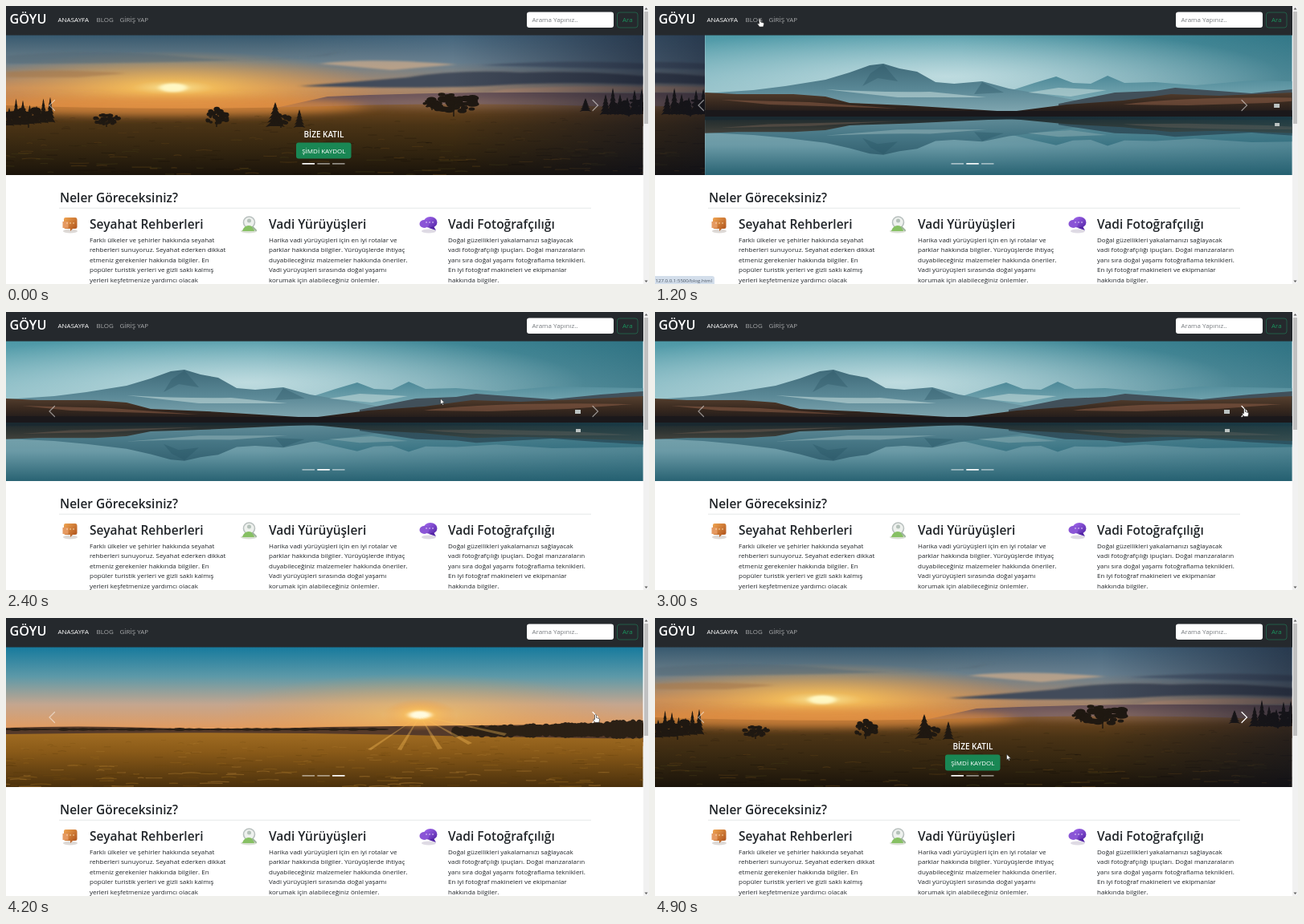
Animation of 800x347 px, one loop 5000 ms. Source, as an HTML page:

```html
<!DOCTYPE html>
<html lang="tr">
<head>
<meta charset="utf-8">
<title>Anasayfa</title>
<style>
html, body { margin: 0; width: 100%; height: 100%; overflow: hidden; background: #fff; }
svg { display: block; }
text { font: 8px "Open Sans", "Noto Sans", sans-serif; fill: #212529; }
.h { font-size: 15.5px; font-weight: 600; }
</style>
</head>
<body>
<svg width="800" height="347" viewBox="0 0 800 347">
<defs>
  <clipPath id="view"><path d="M0 36H792.500V211H0Z"/></clipPath>
  <clipPath id="pic"><path d="M0 36H793V211H0Z"/></clipPath>
  <filter id="soft" x="-20%" y="-60%" width="140%" height="220%"><feGaussianBlur stdDeviation="3 1.2"/></filter>
  <filter id="mist" x="-20%" y="-80%" width="140%" height="260%"><feGaussianBlur stdDeviation="14 5"/></filter>
  <linearGradient id="dawn" x2="0" y2="1">
    <stop stop-color="#37596f"/><stop offset=".3" stop-color="#6b7f8a"/>
    <stop offset=".58" stop-color="#c08c5f"/><stop offset="1" stop-color="#b96a30"/>
  </linearGradient>
  <linearGradient id="cool"><stop offset=".42" stop-color="#6684a0" stop-opacity="0"/><stop offset="1" stop-color="#557591" stop-opacity=".65"/></linearGradient>
  <linearGradient id="shade"><stop offset=".7" stop-color="#0b1020" stop-opacity="0"/><stop offset="1" stop-color="#0b1020" stop-opacity=".55"/></linearGradient>
  <radialGradient id="glow"><stop stop-color="#fff0a0"/><stop offset=".2" stop-color="#ffc657" stop-opacity=".85"/><stop offset="1" stop-color="#f0913a" stop-opacity="0"/></radialGradient>
  <linearGradient id="meadow" x2="0" y2="1">
    <stop stop-color="#72491f"/><stop offset=".3" stop-color="#4a3315"/><stop offset=".7" stop-color="#30230f"/><stop offset="1" stop-color="#1a130a"/>
  </linearGradient>
  <linearGradient id="teal" x2="0" y2="1"><stop stop-color="#4c98a6"/><stop offset=".5" stop-color="#7fb5bf"/><stop offset="1" stop-color="#a9cdd2"/></linearGradient>
  <linearGradient id="deep"><stop offset=".4" stop-color="#1b5a6c" stop-opacity="0"/><stop offset="1" stop-color="#1b5a6c" stop-opacity=".6"/></linearGradient>
  <radialGradient id="haze"><stop stop-color="#d3e8ea" stop-opacity=".75"/><stop offset="1" stop-color="#d3e8ea" stop-opacity="0"/></radialGradient>
  <linearGradient id="lake" x2="0" y2="1"><stop stop-color="#a9cbd1"/><stop offset=".5" stop-color="#8dbac4"/><stop offset="1" stop-color="#2f6b7b"/></linearGradient>
  <linearGradient id="peak" x2="0" y2="1"><stop stop-color="#3f6a79"/><stop offset=".5" stop-color="#5a8896"/><stop offset="1" stop-color="#86abb4"/></linearGradient>
  <linearGradient id="far" x2="0" y2="1"><stop stop-color="#4d8998"/><stop offset="1" stop-color="#98bfc6"/></linearGradient>
  <linearGradient id="shore" x2="0" y2="1"><stop stop-color="#57402f"/><stop offset=".5" stop-color="#38291f"/><stop offset="1" stop-color="#1a1719"/></linearGradient>
  <linearGradient id="dusk" x2="0" y2="1">
    <stop stop-color="#167a9d"/><stop offset=".3" stop-color="#5d99a8"/><stop offset=".58" stop-color="#c4a68f"/><stop offset=".85" stop-color="#e59a5a"/>
  </linearGradient>
  <linearGradient id="wheat" x2="0" y2="1"><stop stop-color="#a06c22"/><stop offset=".35" stop-color="#8a5a18"/><stop offset="1" stop-color="#4a300c"/></linearGradient>
  <linearGradient id="amber" x2="1" y2="1"><stop stop-color="#f0a552"/><stop offset="1" stop-color="#a94c18"/></linearGradient>
  <linearGradient id="violet" x2="1" y2="1"><stop stop-color="#a56cf0"/><stop offset="1" stop-color="#5324a6"/></linearGradient>

  <g id="one" clip-path="url(#pic)">
    <path d="M0 36H793V150H0Z" fill="url(#dawn)"/>
    <path d="M0 36H793V150H0Z" fill="url(#cool)"/>
    <ellipse cx="208" cy="102" rx="260" ry="46" fill="url(#glow)" opacity=".9"/>
    <g filter="url(#soft)">
      <path d="M0 62Q110 52 220 63T420 56L400 62Q240 72 0 72Z" fill="#566a77" opacity=".6"/>
      <path d="M390 72Q450 64 560 73L480 80Z" fill="#e2b58a" opacity=".6"/>
      <path d="M365 100Q440 94 500 89Q560 79 640 83Q720 80 800 88V98Q690 94 610 99T365 100Z" fill="#434c5a"/>
      <path d="M590 74Q690 66 800 72V79Q700 77 590 74Z" fill="#4f6074"/>
      <path d="M620 104Q710 98 800 101V108H600Z" fill="#c4967a" opacity=".7"/>
      <path d="M0 82Q70 78 150 84L90 89H0Z" fill="#a5784c" opacity=".6"/>
      <ellipse cx="208" cy="102" rx="17" ry="5.500" fill="#fff8c4"/>
    </g>
    <path d="M400 113Q560 106 793 109V135H300Z" fill="#6d565b"/>
    <path d="M0 124Q200 131 400 125T793 127V211H0Z" fill="url(#meadow)"/>
    <ellipse cx="200" cy="125" rx="250" ry="12" fill="#e08d40" opacity=".75" filter="url(#mist)"/>
    <ellipse cx="620" cy="122" rx="190" ry="6" fill="#a58270" opacity=".5" filter="url(#mist)"/>
    <g id="grass"></g><g id="trees" fill="#1f1811" stroke="#1f1811"></g>
    <path d="M0 36H793V211H0Z" fill="url(#shade)"/>
    <text x="395.500" y="164" text-anchor="middle" style="font-size:10px;font-weight:600;fill:#fff">BİZE KATIL</text>
    <rect x="361" y="170.500" width="68.500" height="20" rx="3" fill="#198754"/>
    <text x="395.300" y="183.500" text-anchor="middle" style="fill:#fff">ŞİMDİ KAYDOL</text>
  </g>

  <g id="hills">
    <path d="M370 109L410 96L437 88L458 96L480 97L501 87L522 96L560 95L610 99L680 93L793 95V137H370Z" fill="url(#far)"/>
    <path d="M0 109L60 105L100 100L150 92L180 83L205 74L222 72L242 78L264 82L287 95L310 97L345 94L378 103L420 110L470 119V137H0Z" fill="url(#peak)"/>
    <path d="M222 73L240 94L215 90L196 100L206 84ZM345 95L372 108L335 110Z" fill="#2f5866" opacity=".4"/>
    <path d="M150 104Q220 108 280 107L350 114L240 114ZM402 108L440 102L500 105L455 113Z" fill="#bfd7d8" opacity=".6"/>
    <path d="M440 122L510 108L560 106L585 102L625 105L680 109L740 103L793 99V137H440Z" fill="#41505a"/>
    <path d="M0 108L40 110L110 110L150 113L180 121L250 124L380 132L450 123L520 118L580 110L640 112L710 109L793 105V137H0Z" fill="url(#shore)"/>
    <path d="M520 123Q600 112 780 115L700 121L600 124ZM20 117L130 120L240 128L80 123Z" fill="#94624a" opacity=".5"/>
    <path d="M0 130Q390 132 793 130V138H0Z" fill="#1a181b"/>
  </g>
  <g id="two" clip-path="url(#pic)">
    <path d="M0 36H793V140H0Z" fill="url(#teal)"/>
    <path d="M0 36H793V140H0Z" fill="url(#deep)"/>
    <ellipse cx="300" cy="88" rx="420" ry="62" fill="url(#haze)"/>
    <path d="M0 137H793V211H0Z" fill="url(#lake)"/>
    <use href="#hills" transform="matrix(1 0 0 -.75 0 239.750)"/>
    <path d="M0 137H793V211H0Z" fill="#1b4f61" opacity=".3"/>
    <path d="M0 137H793V211H0Z" fill="url(#deep)" opacity=".6"/>
    <use href="#hills"/>
    <path d="M708 122h7v5h-7ZM709 146h6v4h-6Z" fill="#bcc3c2"/>
  </g>

  <g id="three" clip-path="url(#pic)">
    <path d="M0 36H793V160H0Z" fill="url(#dusk)"/>
    <ellipse cx="515" cy="121" rx="250" ry="52" fill="url(#glow)" opacity=".55"/>
    <path d="M0 137Q90 134 180 137T400 136L590 134L793 132V155H0Z" fill="#553a2a"/>
    <path d="M0 145Q250 141 500 146T793 150V211H0Z" fill="url(#wheat)"/>
    <g id="stalks"></g><g id="hedge" fill="#2b2015"></g>
    <ellipse cx="515" cy="121" rx="46" ry="20" fill="url(#glow)"/>
    <ellipse cx="515" cy="121" rx="14" ry="5" fill="#fffbe0" filter="url(#soft)"/>
    <path d="M515 122L450 164L454 165ZM515 122L487 164L492 165ZM515 122L537 164L543 163ZM515 122L575 158L580 156ZM515 122L620 147L623 144Z" fill="#ffc45d" opacity=".35"/>
  </g>
  <path id="chevron" d="M3 -6.500L-3.500 0L3 6.500" fill="none" stroke="#fff" stroke-width="1.200" stroke-linecap="round"/>
</defs>

<rect width="800" height="347" fill="#fff"/>
<g clip-path="url(#view)"><g id="track">
  <use href="#one"/><use href="#two" x="793"/><use href="#three" x="1586"/><use href="#one" x="2379"/>
</g></g>
<g id="dots" fill="#fff">
  <rect x="368.500" y="196" width="15.500" height="1.700"/><rect x="387.300" y="196" width="15.500" height="1.700"/><rect x="406" y="196" width="15.500" height="1.700"/>
</g>
<use href="#chevron" x="57.500" y="124" opacity=".5"/>
<use href="#chevron" id="next" transform="translate(733 124) scale(-1 1)"/>

<rect width="793" height="36.500" fill="#25292d"/>
<text x="4.500" y="22" style="font-size:16.2px;font-weight:600;fill:#fff">GÖYU</text>
<text x="64.500" y="20" style="fill:#fff">ANASAYFA</text>
<g opacity=".6"><text x="112.500" y="20" style="fill:#fff">BLOG</text><text x="141.500" y="20" style="fill:#fff">GİRİŞ YAP</text></g>
<rect x="648" y="7.500" width="108" height="19.500" rx="3" fill="#fff"/>
<text x="654.500" y="20" style="fill:#777b7f">Arama Yapınız..</text>
<rect x="760.500" y="8" width="25.500" height="19" rx="3" fill="none" stroke="#226b50" stroke-width=".8"/>
<text x="773.300" y="20" text-anchor="middle" style="fill:#1b935d">Ara</text>

<rect x="793" width="7" height="347" fill="#f1f1f1"/>
<rect x="794" y="7" width="5" height="140" fill="#c1c1c1"/>
<path d="M794.500 4.500L796.500 2L798.500 4.500ZM794.500 342.500L796.500 345L798.500 342.500Z" fill="#606060"/>

<text class="h" x="67" y="245">Neler Göreceksiniz?</text>
<path d="M66 252.300H728" stroke="#dcdee0" stroke-width=".7"/>
<g>
  <ellipse cx="80" cy="281" rx="9" ry="2.500" fill="#ddd9d6"/>
  <path d="M74 264H86Q88.500 264 88.500 267V276Q88.500 278 86 278H83L80 281V278H74Q72 278 72 276V266Q72 264 74 264Z" fill="url(#amber)"/>
  <path d="M70.500 269h7v8h-7Z" fill="#e59a62"/>
  <path d="M76 271h.1M80 271h.1M84 271h.1" stroke="#ffe2b5" stroke-width="1.500" stroke-linecap="round"/>
</g>
<g>
  <ellipse cx="302" cy="281" rx="10" ry="2.500" fill="#d9dfd3"/>
  <circle cx="302.500" cy="270" r="7" fill="#eef1ee" stroke="#b9c1bf" stroke-width="1.600"/>
  <circle cx="302.500" cy="268" r="2.500" fill="#b5c2ba"/>
  <path d="M294 281Q296 274 302 274T309 281Z" fill="#86c063"/>
  <path d="M307 276L311 280" stroke="#9db39b" stroke-width="2" stroke-linecap="round"/>
</g>
<g>
  <ellipse cx="526" cy="281" rx="9" ry="2.500" fill="#dedae4"/>
  <ellipse cx="528" cy="270" rx="8.500" ry="7" fill="url(#violet)"/>
  <path d="M532 275L535 280L526 277Z" fill="#5324a6"/>
  <ellipse cx="520.500" cy="272" rx="6" ry="5" fill="#8a55d6"/>
  <path d="M523 270h.1M527 270h.1M531 270h.1" stroke="#efe3ff" stroke-width="1.500" stroke-linecap="round"/>
</g>
<g id="copy"></g>

<g id="status">
  <path d="M0 337H71Q74 337 74 340V347H0Z" fill="#d3deeb"/>
  <text x=".5" y="344.700" style="font-size:6.1px;fill:#4a5562">127.0.0.1:5500/blog.html</text>
</g>
<g id="cursor" stroke="#222" stroke-width=".6" fill="#fff" stroke-linejoin="round">
  <path id="arrow" d="M0 0V7.200L1.700 5.700L2.800 8.200L3.900 7.700L2.900 5.300H5.200Z"/>
  <path id="hand" d="M-1 .5Q0 -.6 1 .5V4L4.500 5Q5.300 5.300 5.100 6.500L4.200 10H-.5L-3 6.600Q-3 5.200 -1 6.200Z"/>
</g>
</svg>

<script>
const $ = id => document.getElementById(id);

// scenery
let seed = 7;
const rnd = (a = 0, b = 1) => {
  seed = (seed * 16807) % 2147483647;
  return a + (b - a) * seed / 2147483647;
};
const repeat = (n, f) => Array.from({ length: n }, (_, i) => f(i)).join('');

const bush = (x, base, w, h) => repeat(40, () => {
  const a = rnd(0, 6.28), r = Math.sqrt(rnd()) * .42, size = rnd(.05, .11);
  return `<ellipse cx="${x + Math.cos(a) * r * w}" cy="${base - h * .55 + Math.sin(a) * r * h * .9}" rx="${w * size}" ry="${h * size * 1.2}" stroke="none"/>`;
}) + `<path d="M${x} ${base}V${base - h * .5}" stroke-width="1.5"/>`;

const fir = (x, base, w, h) => {
  const side = s => Array.from({ length: 6 }, (_, i) => {
    const y = base - h + h * (i + 1) / 6, r = w * (i + 1) / 12;
    return [`${x + s * r},${y}`, `${x + s * r * .55},${y - 1}`];
  }).flat();
  return `<polygon points="${x},${base - h} ${side(1).join(' ')} ${side(-1).reverse().join(' ')}" stroke="none"/>`;
};

const blades = (n, top, colors) => repeat(n, i => {
  const d = rnd(), y = top + (211 - top) * d, len = 6 + 26 * d * rnd();
  return `<path d="M${rnd(-10, 793)} ${y}q${len / 2} ${rnd(-2, 1)} ${len} 0" fill="none" stroke="${colors[i % colors.length]}" stroke-width="${.4 + d}" opacity=".4"/>`;
});

$('grass').innerHTML = blades(300, 138, ['#674617', '#171009', '#433a16', '#241a0c']);
$('stalks').innerHTML = blades(340, 152, ['#b98639', '#553709', '#9c6b1e', '#6d470f']);
$('trees').innerHTML =
  repeat(7, i => fir(4 + i * 8.5, 150 - i * .7, 13, rnd(22, 38))) +
  bush(28, 152, 62, 26) + bush(125, 151, 35, 18) + bush(262, 151, 36, 24) +
  fir(335, 151, 24, 31) + bush(342, 152, 28, 18) + fir(365, 152, 15, 23) +
  bush(557, 138, 74, 32) + bush(530, 130, 26, 14) + fir(721, 132, 15, 17) +
  repeat(6, i => fir(746 + i * 9, 136, 15, rnd(22, 34))) + bush(775, 138, 50, 22);
$('hedge').innerHTML =
  repeat(60, i => `<ellipse cx="${560 + i * 4}" cy="${142 - i * .06}" rx="6" ry="${rnd(3, 7) + i * .1}"/>`) +
  repeat(40, i => `<ellipse cx="${i * 12}" cy="139" rx="8" ry="${rnd(.8, 2)}"/>`);

// page text
const columns = [
  [104, 'Seyahat Rehberleri', 'Farklı ülkeler ve şehirler hakkında seyahat', 'rehberleri sunuyoruz. Seyahat ederken dikkat',
    'etmeniz gerekenler hakkında bilgiler. En', 'popüler turistik yerleri ve gizli saklı kalmış', 'yerleri keşfetmenize yardımcı olacak'],
  [327, 'Vadi Yürüyüşleri', 'Harika vadi yürüyüşleri için en iyi rotalar ve', 'parklar hakkında bilgiler. Yürüyüşlerde ihtiyaç',
    'duyabileceğiniz malzemeler hakkında öneriler.', 'Vadi yürüyüşleri sırasında doğal yaşamı', 'korumak için alabileceğiniz önlemler.'],
  [550, 'Vadi Fotoğrafçılığı', 'Doğal güzellikleri yakalamanızı sağlayacak', 'vadi fotoğrafçılığı ipuçları. Doğal manzaraların',
    'yanı sıra doğal yaşamı fotoğraflama teknikleri.', 'En iyi fotoğraf makineleri ve ekipmanlar', 'hakkında bilgiler.']
];
$('copy').innerHTML = columns.map(([x, title, ...lines]) =>
  `<text class="h" x="${x}" y="277.5">${title}</text>` +
  lines.map((s, i) => `<text x="${x}" y="${294.8 + 12.5 * i}">${s}</text>`).join('')).join('');

// motion
const LOOP = 5000, STEP = 100, SLIDE = 495, starts = [802, 3620, 4280];
const path = [ // time, x, y
  [500, 300, -20], [800, 269, 20.5], [1120, 130.5, 16], [1350, 130.5, 16], [1650, 229, 88],
  [1850, 229, 88], [2800, 733.5, 120.5], [4450, 733.5, 120.5], [4850, 437.5, 170]
];
const clamp = v => Math.max(0, Math.min(1, v));
const smooth = s => s * s * (3 - 2 * s);

// cubic-bezier(.42, 0, .58, 1)
function easeInOut(x) {
  let lo = 0, hi = 1;
  for (let i = 0; i < 20; i++) {
    const s = (lo + hi) / 2, r = 1 - s;
    if (1.26 * r * r * s + 1.74 * r * s * s + s * s * s < x) lo = s; else hi = s;
  }
  return smooth(hi);
}

function pointer(t) {
  let i = 0;
  while (i < path.length - 2 && t > path[i + 1][0]) i++;
  const [t0, x0, y0] = path[i], [t1, x1, y1] = path[i + 1];
  const k = smooth(clamp((t - t0) / (t1 - t0)));
  return [x0 + (x1 - x0) * k, y0 + (y1 - y0) * k];
}

const show = (id, on) => $(id).setAttribute('visibility', on ? 'visible' : 'hidden');

function draw() {
  const t = Math.floor(performance.now() % LOOP / STEP) * STEP;
  const p = starts.reduce((sum, s) => sum + (t > s ? easeInOut(clamp((t - s) / SLIDE)) : 0), 0);
  $('track').setAttribute('transform', `translate(${-793 * p} 0)`);
  [...$('dots').children].forEach((dot, i) => {
    const gap = Math.abs(p - i);
    dot.setAttribute('opacity', .5 + .5 * clamp(1 - Math.min(gap, 3 - gap)));
  });

  const [x, y] = pointer(t);
  const inNav = y > 8 && y < 30, onBlog = inNav && x > 109 && x < 137;
  const onSide = y > 36 && y < 211 && (x > 674 || x < 119);
  const hand = onSide || onBlog || inNav && x > 137 && x < 182;
  $('cursor').setAttribute('transform', `translate(${x} ${y})`);
  show('hand', hand);
  show('arrow', !hand);
  show('status', onBlog);
  $('next').setAttribute('opacity', onSide || t > 3600 ? 1 : .5);
  requestAnimationFrame(draw);
}
draw();
</script>
</body>
</html>
```
